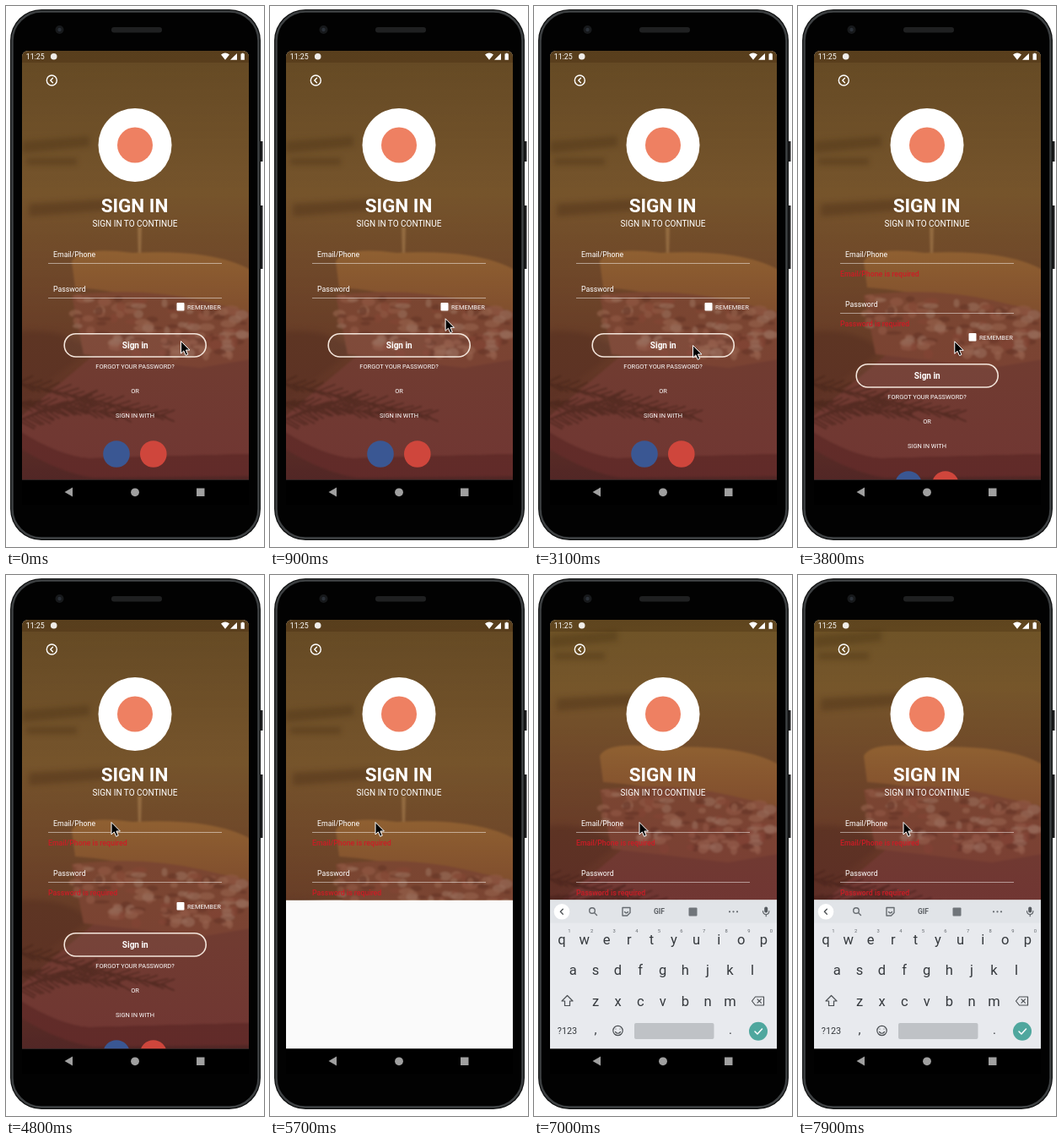
An HTML page that plays this animation: 306 by 640 pixels, repeating every 8 s.

```html
<!DOCTYPE html>
<html lang="en">
<head>
<meta charset="utf-8">
<title>Sign in screen</title>
<style>
  html, body { margin: 0; width: 100%; height: 100%; overflow: hidden; background: #fff; }
  svg { display: block; width: 306px; height: 640px; font-family: Roboto, Arial, sans-serif; }
  .mid { text-anchor: middle; }
  .line { fill: none; stroke-linecap: round; stroke-linejoin: round; }
  .keys { fill: #35393d; }
</style>
</head>
<body>
<svg viewBox="0 0 306 640">
  <defs>
    <clipPath id="screen"><path d="M19 560.500V61q0-8 8-8H280q8 0 8 8V560.500z"/></clipPath>
    <clipPath id="view"><rect id="viewRect" x="19" y="53" width="269" height="508"/></clipPath>
    <linearGradient id="photoTone" x1="0" y1="0" x2="0" y2="1">
      <stop offset="0" stop-color="#7d6446"/>
      <stop offset=".33" stop-color="#a88f52"/>
      <stop offset=".48" stop-color="#9b7d4b"/>
      <stop offset=".72" stop-color="#80603f"/>
      <stop offset="1" stop-color="#504037"/>
    </linearGradient>
    <linearGradient id="tint" x1="0" y1="0" x2="0" y2="1">
      <stop offset="0" stop-color="#54380e"/>
      <stop offset="1" stop-color="#54161a"/>
    </linearGradient>
    <linearGradient id="crust" x1="0" y1="0" x2="0" y2="1">
      <stop offset="0" stop-color="#e8b45e"/>
      <stop offset="1" stop-color="#c08c50"/>
    </linearGradient>
    <filter id="soft"><feGaussianBlur stdDeviation="3"/></filter>
    <filter id="slight"><feGaussianBlur stdDeviation=".9"/></filter>
  </defs>

  <!-- phone body -->
  <path d="M301 160h3.5v24H301zM301 236h3.5v75H301z" fill="#1c1d1e"/>
  <rect x="5" y="4" width="297" height="628" rx="37" fill="#0c0d0d"/>
  <rect x="7.500" y="6.500" width="292" height="623" rx="34.500" fill="#020202" stroke="#3e4143" stroke-width="2.500"/>
  <rect x="125" y="25" width="60" height="6.500" rx="3.200" fill="#1f2021"/>
  <circle cx="63.500" cy="28" r="5" fill="#17191b"/>
  <circle cx="63.500" cy="28" r="2.200" fill="#2a3038"/>

  <g clip-path="url(#screen)">
    <rect x="19" y="53" width="269" height="508" fill="#fafafa"/>
    <g clip-path="url(#view)">
      <g id="photo">
        <rect x="19" y="53" width="269" height="508" fill="url(#photoTone)"/>
        <g filter="url(#soft)">
          <path d="M19 160l80-6v12l-80 8zM24 180h60v8H24zM27 234l102-6v13l-102 8z" fill="#4c3c22" opacity=".5"/>
          <path d="M15 385Q70 380 100 408L15 470z" fill="#6c5238"/>
        </g>
        <g filter="url(#slight)">
          <path d="M15 488L105 412H292V530L98 535Q62 532 15 502z" fill="#9b6659"/>
          <path d="M15 502Q62 532 98 535L292 530V556L104 558Q62 552 15 522z" fill="#744a40"/>
          <path d="M156 262h5l-1 34h-3z" fill="#f0cc84"/>
          <path d="M78 302Q88 284 150 292 245 287 290 312V368Q240 350 190 352 130 336 82 333z" fill="url(#crust)"/>
          <path d="M78 342Q160 332 230 348L290 362V418L230 428 92 412z" fill="#b4785c"/>
          <g id="filling"></g>
          <g id="herbs" class="line" stroke="#3a3420" opacity=".7"></g>
        </g>
      </g>
      <rect id="tintRect" x="19" y="53" width="269" height="508" fill="url(#tint)" opacity=".6"/>
      <rect x="19" y="53" width="269" height="14" fill="#2a1800" opacity=".2"/>

      <g class="line" stroke="#fff" stroke-width="1.400">
        <circle cx="54.300" cy="88" r="6"/>
        <path d="M55.500 85.300l-2.700 2.700 2.700 2.700"/>
      </g>
      <circle cx="153" cy="164.500" r="43.500" fill="#fff"/>
      <circle cx="153" cy="164.500" r="21" fill="#ee8062"/>

      <g fill="#fff">
        <text class="mid" x="152.500" y="244.200" font-size="22.500" font-weight="700">SIGN IN</text>
        <text class="mid" x="153" y="261.300" font-size="10">SIGN IN TO CONTINUE</text>
        <text x="56" y="297.200" font-size="8.750">Email/Phone</text>
        <path d="M50 304h206v.8H50z" opacity=".65"/>
        <g id="password">
          <text x="56" y="338" font-size="8.750">Password</text>
          <path d="M50 345h206v.8H50z" opacity=".65"/>
        </g>
        <g id="actions">
          <rect id="check" x="202.500" y="351" width="9" height="9.500" rx="1"/>
          <text x="215" y="358.700" font-size="7.500">REMEMBER</text>
          <rect x="69.200" y="387.700" width="168" height="27.300" rx="13.600" fill="#fff" fill-opacity=".04" stroke="#f4e6dc" stroke-width="1.600"/>
          <text class="mid" x="153.300" y="405" font-size="10" font-weight="700">Sign in</text>
          <g class="mid" font-size="7.450">
            <text x="153" y="429">FORGOT YOUR PASSWORD?</text>
            <text x="153" y="458">OR</text>
            <text x="153" y="487">SIGN IN WITH</text>
          </g>
          <circle cx="131" cy="530" r="15.800" fill="#3a5793"/>
          <circle cx="174.800" cy="530" r="15.800" fill="#cf463c"/>
        </g>
      </g>
      <g id="errors" fill="#cc1c26" font-size="8.750" font-weight="500">
        <text x="50" y="320">Email/Phone is required</text>
        <text x="50" y="379">Password is required</text>
      </g>
    </g>

    <!-- status bar -->
    <g fill="#fff">
      <text x="23.800" y="63.200" font-size="8.750">11:25</text>
      <circle cx="56.700" cy="59.800" r="3.800" opacity=".9"/>
      <path d="M255 57.500q5-4 10 0l-5 6.300zM274 56v7.800h-8zM278.500 56.600h1.200v-.9h2v.9h1.200v7.200h-4.400z"/>
    </g>

    <g id="keyboard">
      <rect x="19" y="384.500" width="269" height="177" fill="#e8eaee"/>
      <rect x="19" y="384.500" width="269" height="27" fill="#e1e4e8"/>
      <circle cx="33" cy="398.300" r="9.300" fill="#fff"/>
      <path id="chevron" class="line" stroke="#4a4e52" stroke-width="1.300"/>
      <g id="tools">
        <g class="line" stroke="#666b70" stroke-width="1.400">
          <circle cx="69" cy="397" r="3.300"/><path d="M71.500 399.500l3 3"/>
          <path d="M105 393.500h9v6l-3.500 3.500H105zM107.500 398.500q2 2.500 4 0"/>
        </g>
        <text class="mid" x="148.500" y="401.300" font-size="8.500" font-weight="700" fill="#5c6065">GIF</text>
        <rect x="183.500" y="393.500" width="10" height="10" rx="1" fill="#70757a"/>
        <path d="M232 398.300h.01M236.500 398.300h.01M241 398.300h.01" class="line" stroke="#666b70" stroke-width="2.200"/>
      </g>
      <rect x="273.200" y="392.500" width="4" height="7" rx="2" fill="#555a5f"/>
      <path d="M271.500 397.500q.2 4 3.700 4t3.700-4M275.200 401.500v2.300" class="line" stroke="#555a5f" stroke-width="1.100"/>
      <g id="keys" class="keys mid" font-size="16.500"></g>
      <g id="digits" class="mid" fill="#62676c" font-size="5.800"></g>
      <path id="shift" d="M39.500 497.500l6.500 6.500h-3.500v5.500h-6v-5.500H33z" stroke="#4a4e52" stroke-width="1.200" stroke-linejoin="round"/>
      <path d="M258.500 504l4-5h10v10h-10zM265 501.800l4.400 4.400M269.400 501.800l-4.400 4.400" class="line" stroke="#4a4e52" stroke-width="1.200"/>
      <g class="keys mid" font-size="10.800">
        <text x="39.500" y="543">?123</text>
        <text x="73" y="543" font-size="15">,</text>
        <text x="233" y="543" font-size="15">.</text>
      </g>
      <g class="line" stroke="#4a4e52" stroke-width="1.200">
        <circle cx="99.500" cy="539" r="5.700"/>
        <path d="M97 537h.01M102 537h.01M96.500 540.500q3 3.500 6 0"/>
      </g>
      <rect x="119" y="530" width="94.500" height="19" rx="2" fill="#bfc2c6"/>
      <circle cx="266" cy="539.800" r="11" fill="#4fa79e"/>
      <path d="M262 540l3 3 5.500-6" class="line" stroke="#fff" stroke-width="1.500"/>
    </g>
  </g>

  <!-- navigation bar -->
  <rect x="19" y="560.500" width="269" height="30" fill="#000"/>
  <g fill="#a0a0a0">
    <path d="M69.500 575l9.500-5.500v11z"/>
    <circle cx="153" cy="575.300" r="4.900"/>
    <rect x="226" y="570.500" width="9.500" height="9.500"/>
  </g>

  <path id="cursor" d="M0 0V14.500L3.300 11.400 5.700 16.800 8.200 15.700 5.900 10.500H10.400z" fill="#000" stroke="#fff" stroke-width="1"/>
</svg>

<script>
const $ = id => document.getElementById(id);
const LOOP = 8000, STEP = 100;
const ERRORS_AT = 3500, RESIZE_AT = 5600, RISE_AT = 5800, RISE = 250, LOWER_AT = 6400, TOOLS = 200;

// time, x, y
const CURSOR = [
  [0, 207.5, 396.5], [500, 207.5, 396.5], [1200, 208.5, 352.5], [2200, 208.5, 352.5],
  [2800, 188.5, 401.5], [3700, 188.5, 401.5], [4500, 125, 292.5], [LOOP, 125, 292.5]
];

function add(parent, tag, attrs, text) {
  const el = document.createElementNS('http://www.w3.org/2000/svg', tag);
  for (const k in attrs) el.setAttribute(k, attrs[k]);
  if (text) el.textContent = text;
  parent.append(el);
  return el;
}

function seeded(seed) {
  return () => (seed = (seed * 16807) % 2147483647) / 2147483647;
}

function buildPhoto() {
  const rnd = seeded(71);
  const tones = ['#f6c09c', '#eaa888', '#c87860', '#fad8bc', '#80503e'];
  for (let i = 0; i < 130; i++) {
    const x = 82 + rnd() * 200;
    add($('filling'), 'ellipse', {
      cx: x, cy: 342 + (x - 82) * .09 + rnd() * 64, rx: 3 + rnd() * 7, ry: 2 + rnd() * 4,
      fill: tones[i % tones.length], opacity: .65
    });
  }
  const stems = [[15, 446, 190, 486], [15, 470, 135, 482], [15, 490, 95, 462]];
  for (const [x1, y1, x2, y2] of stems) {
    let d = `M${x1} ${y1}L${x2} ${y2}`;
    for (let k = 0; k < 1; k += .06) {
      const x = x1 + (x2 - x1) * k, y = y1 + (y2 - y1) * k;
      d += `M${x} ${y}l${14 + rnd() * 6} ${-3 - rnd() * 6}M${x} ${y}l${13 + rnd() * 6} ${6 + rnd() * 5}`;
    }
    add($('herbs'), 'path', { d, 'stroke-width': 2 });
  }
}

const keys = [];
function buildKeys() {
  const rows = [['qwertyuiop', 33, 437], ['asdfghjkl', 46.3, 473], ['zxcvbnm', 73, 509.8]];
  for (const [letters, x, y] of rows)
    [...letters].forEach((c, i) => keys.push([add($('keys'), 'text', { x: x + i * 26.6, y }, c), c]));
  [...'1234567890'].forEach((n, i) => add($('digits'), 'text', { x: 42 + i * 26.6, y: 423 }, n));
}

const clamp = v => Math.max(0, Math.min(1, v));
const ease = v => v * v * (3 - 2 * v);
const show = (id, on) => $(id).setAttribute('opacity', +on);
const move = (id, x, y) => $(id).setAttribute('transform', `translate(${x} ${y})`);

function cursorAt(t) {
  const i = CURSOR.findIndex(p => p[0] > t);
  const [t0, x0, y0] = CURSOR[i - 1], [t1, x1, y1] = CURSOR[i];
  const k = ease((t - t0) / (t1 - t0));
  return [x0 + (x1 - x0) * k, y0 + (y1 - y0) * k];
}

let upper;
function setCase(on) {
  if (on === upper) return;
  upper = on;
  for (const [el, c] of keys) el.textContent = on ? c.toUpperCase() : c;
  $('shift').setAttribute('fill', on ? '#4a4e52' : 'none');
  $('chevron').setAttribute('d', on ? 'M31.700 395.300l3 3-3 3' : 'M34.300 395.300l-3 3 3 3');
}

function draw(t) {
  const failed = t >= ERRORS_AT, risen = t >= RISE_AT;
  show('check', t < 1400 || t >= 2300);
  show('errors', failed);
  move('password', 0, failed ? 18 : 0);
  move('actions', 0, failed ? 36 : 0);
  $('viewRect').setAttribute('height', t < RESIZE_AT ? 508 : 331.5);
  $('tintRect').setAttribute('height', risen ? 331.5 : 508);
  move('photo', 0, risen ? -88 : 0);
  const rise = clamp((t - RISE_AT) / RISE);
  move('keyboard', 0, 177 * (1 - rise) ** 2);
  show('keyboard', risen);
  setCase(t < LOWER_AT);
  $('tools').setAttribute('opacity', clamp((t - LOWER_AT) / TOOLS));
  move('cursor', ...cursorAt(t));
}

function frame() {
  const t = performance.now() % LOOP;
  draw(Math.floor(t / STEP) * STEP);
  requestAnimationFrame(frame);
}

buildPhoto();
buildKeys();
frame();
</script>
</body>
</html>
```
